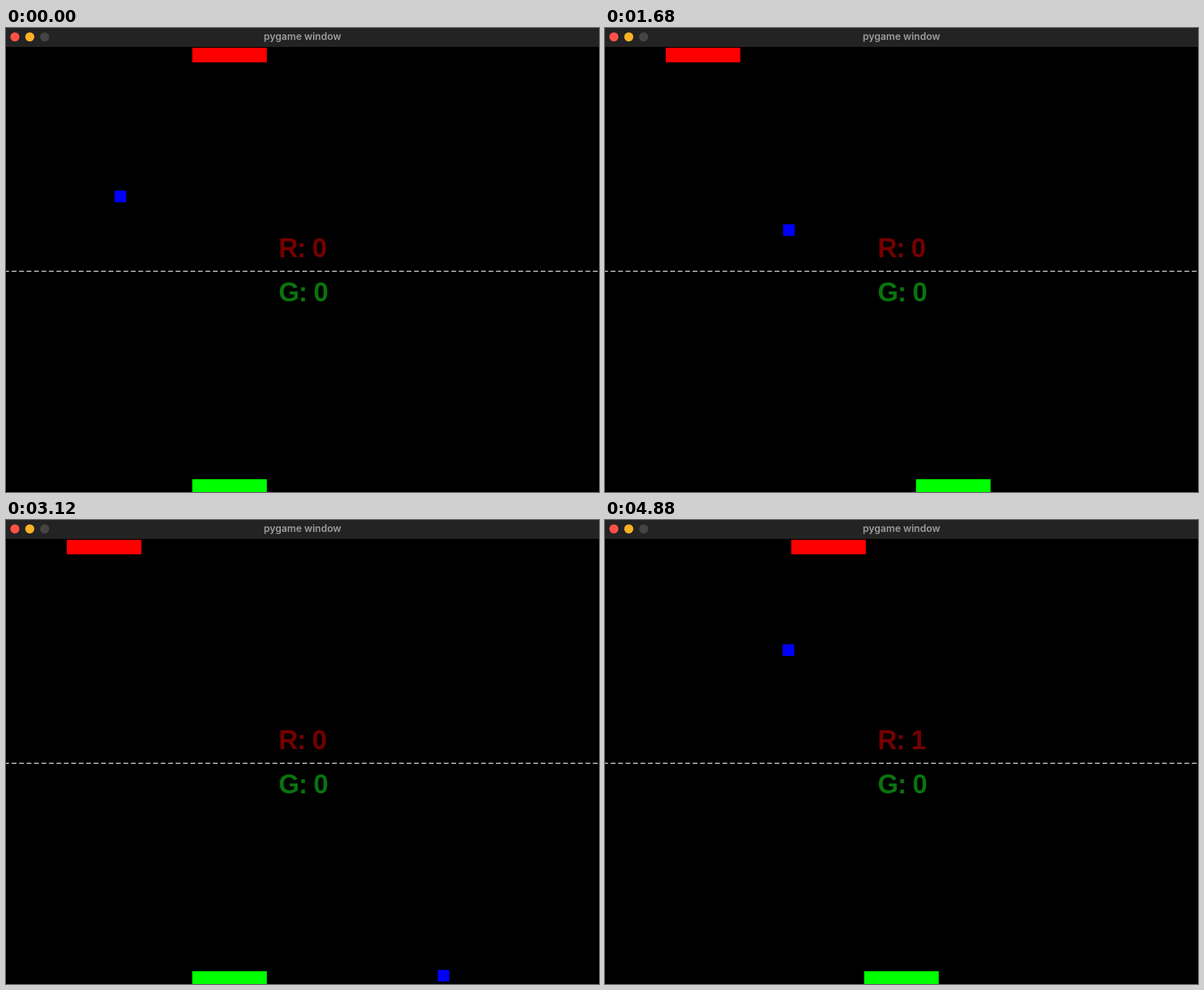
An HTML page with a canvas for the animation above (4.96 s loop, 846 by 662 pixels).

```html
<!DOCTYPE html>
<html>
<head>
<meta charset="utf-8">
<title>pygame window</title>
<style>
  html, body { margin: 0; height: 100%; overflow: hidden; background: #000; }
  canvas { display: block; }
</style>
</head>
<body>
<canvas width="846" height="662"></canvas>
<script>
const ctx = document.querySelector('canvas').getContext('2d');
const STEP = 80, STEPS = 62;      // ms per picture, pictures per loop
const MISSED = 39, SERVED = 44;   // steps when the ball is lost and served again
const PADDLE_SPEED = 35.5, BALL_SPEED = 20.1, SERVE_SPEED = 10.3;
const HOME = 370;

function rect(color, x, y, w, h) {
  ctx.fillStyle = color;
  ctx.fillRect(x, y, w, h);
}

function text(str, x, y, color, font, align = 'left', spacing = 0) {
  ctx.fillStyle = color;
  ctx.font = font;
  ctx.textAlign = align;
  ctx.letterSpacing = spacing + 'px';
  ctx.fillText(str, x, y);
}

// Each key press sends the paddle towards a new place at constant speed
function glide(step, x, ...moves) {
  for (const [start, to] of moves) {
    const reach = PADDLE_SPEED * Math.max(0, step - start);
    x += Math.max(-reach, Math.min(reach, to - x));
  }
  return x;
}

function redX(step) {
  return step < SERVED
    ? glide(step, 266, [0, -46], [11.9, 87])
    : glide(step, HOME, [52, 266]);
}

function greenX(step) {
  return step < SERVED
    ? glide(step, 266, [5, 335], [7, 266], [15.6, 444], [32.9, 266])
    : HOME;
}

// First rally bounces off the left wall and the red paddle, then a slower serve
function ballAt(step) {
  if (step >= SERVED) {
    const way = SERVE_SPEED * (step - SERVED);
    return [428.5 - way, 352.5 - way];
  }
  const way = BALL_SPEED * Math.min(step, MISSED);
  return [Math.abs(161.5 - way) - 6.5, Math.abs(187 - way) + 45];
}

function titleBar() {
  rect('#232323', 0, 0, 846, 27);
  ['#ff5147', '#fdb124', '#444'].forEach((color, i) => {
    ctx.fillStyle = color;
    ctx.beginPath();
    ctx.arc(12.7 + i * 21.2, 12.7, 6.5, 0, Math.PI * 2);
    ctx.fill();
  });
  text('pygame window', 423, 17, '#9c9c9c', '600 14px Inter, sans-serif', 'center');
}

function centerLine() {
  for (let x = -2.5; x < 846; x += 10.63) rect('#b4b4b4', x, 346.3, 6.8, 1.7);
}

function score(str, y, color) {
  text(str, 389, y, color, 'bold 38px "Liberation Sans", Arial, sans-serif', 'left', -1);
}

function draw(now) {
  const step = Math.floor(now / STEP) % STEPS;
  rect('#000', 0, 0, 846, 662);
  centerLine();
  rect('#f00', redX(step) - 0.3, 28.3, 106.4, 20.7);
  rect('#0f0', greenX(step) - 0.3, 643.7, 106.4, 18.3);
  rect('#00f', ...ballAt(step), 16.5, 16.5);
  score('R: ' + (step < SERVED ? 0 : 1), 327, '#750000');
  score('G: 0', 390.3, '#0a720e');
  titleBar();
  requestAnimationFrame(draw);
}
requestAnimationFrame(draw);
</script>
</body>
</html>
```
